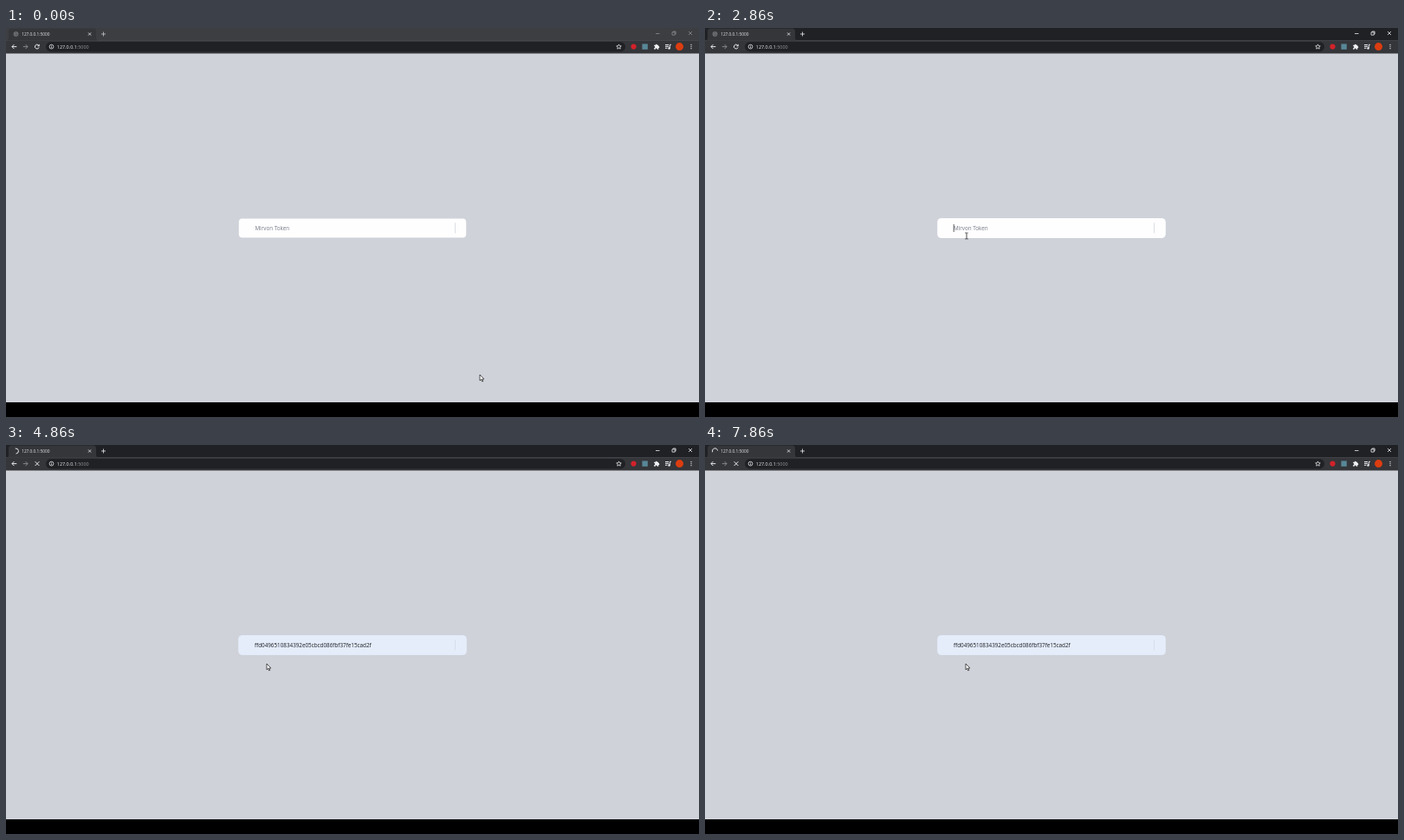
An HTML page for the animation above (8 s loop, 800 by 450 pixels).

```html
<!DOCTYPE html>
<html lang="en">
<head>
<meta charset="utf-8">
<title>Token form</title>
<style>
  html, body { margin: 0; width: 100%; height: 100%; overflow: hidden; background: #000; }
  svg { display: block; width: 100vw; height: 100vh; }
  text { font-family: "Open Sans", "Noto Sans", sans-serif; white-space: pre; }
  .line { fill: none; stroke: #e8eaed; stroke-width: 1; }
  .dim { stroke: #85878b; }
  .thin { stroke-width: .8; }
  #strip { fill: #202124; }
  .inactive #strip { fill: #3c3e42; }
  .inactive #buttons { stroke: #898b8f; }
  .inactive #plus { stroke: #c4c6c9; }
</style>
</head>
<body>
<svg id="stage" viewBox="0 0 800 450">
  <rect width="800" height="450" fill="#cfd2d9"/>

  <!-- tab strip -->
  <rect id="strip" width="800" height="14.5"/>
  <path d="M0 14.5Q3 14.5 3 11.5V4Q3 .5 6.5 .5H100.5Q104 .5 104 4V11.5Q104 14.5 107 14.5Z" fill="#35363a"/>
  <g id="globe">
    <circle cx="11.5" cy="7" r="2.6" fill="#55575b" stroke="#85878b" stroke-width=".6"/>
    <path d="M9.5 5.5L11.4 6.6L11 8.6M12 4.7L13.6 6.8" fill="none" stroke="#85878b" stroke-width=".6"/>
  </g>
  <path id="spinner" class="line" stroke-linecap="round"/>
  <text x="18.2" y="8.8" font-size="4.75" fill="#e4e6e9">127.0.0.1:5000</text>
  <path class="line thin" d="M95 5.4L98.2 8.6M98.2 5.4L95 8.6"/>
  <path id="plus" class="line thin" d="M112.5 4.5V9.5M110 7H115"/>
  <path id="buttons" class="line thin" d="M750 6.5H754.5M769 4.9H772.2V8.1H769ZM770 4.8V4H773.1V7.1H772.3M788 4L792 8M792 4L788 8"/>

  <!-- toolbar -->
  <rect y="14.2" width="800" height="15.3" fill="#35363a"/>
  <rect x="46" y="16" width="669" height="11.4" rx="5.7" fill="#202124"/>
  <path class="line" d="M12.3 21.6H7M9.4 19.1L6.9 21.6L9.4 24.1"/>
  <path class="line dim" d="M19.8 21.6H25M22.6 19.1L25.1 21.6L22.6 24.1"/>
  <g id="reload">
    <path class="line" d="M37.6 20A2.4 2.4 0 1 0 38.1 22.4"/>
    <path d="M38.7 18.5V21.2H36Z" fill="#e8eaed"/>
  </g>
  <path id="stop" class="line" d="M33.6 19.2L38.4 24M38.4 19.2L33.6 24"/>
  <circle class="line thin" cx="52.5" cy="21.6" r="2.4"/>
  <path class="line thin" d="M52.5 21.3V23M52.5 20.1V20.7"/>
  <text x="58.8" y="23.6" font-size="5.45" fill="#eceef0">127.0.0.1<tspan fill="#94989d">:5000</tspan></text>
  <path id="star" class="line thin" stroke-linejoin="round"/>
  <circle cx="724.5" cy="21.6" r="3.1" fill="#d3222a"/>
  <rect x="734.4" y="18.4" width="6.4" height="6.4" fill="#588897"/>
  <path d="M748.2 19.8H749.7A1.1 1.1 0 0 1 751.9 19.8H753.2V21.1A1.1 1.1 0 0 1 753.2 23.3V24.7H751.8A1.1 1.1 0 0 0 749.6 24.7H748.2V23.2A1.1 1.1 0 0 0 748.2 21Z" fill="#f1f3f4"/>
  <path class="line" d="M761 19.5H765M761 21.4H765M761 23.3H763.4M766.3 23.5V19.3H767.9"/>
  <circle cx="765.5" cy="23.5" r="1.2" fill="#e8eaed"/>
  <circle cx="777.5" cy="21.6" r="4.5" fill="#dc3d10"/>
  <g fill="#e8eaed">
    <circle cx="791" cy="19.5" r=".65"/><circle cx="791" cy="21.6" r=".65"/><circle cx="791" cy="23.7" r=".65"/>
  </g>

  <!-- form -->
  <rect id="field"/>
  <path id="divider" d="M518.5 225.3V237.3" stroke-width=".8"/>
  <text id="label" y="234.2" font-size="6.32"></text>
  <path id="caret" d="M287.2 227V236" stroke="#222" stroke-width=".7"/>

  <!-- pointer -->
  <path id="arrow" d="M0 0V6.9L1.6 5.5L2.7 8L3.8 7.5L2.7 5.1H4.8Z" fill="#fff" stroke="#111" stroke-width=".7" stroke-linejoin="round"/>
  <path id="beam" d="M-1.7 -3.5H-.4L0 -3.1L.4 -3.5H1.7M0 -3.1V3.1M-1.7 3.5H-.4L0 3.1L.4 3.5H1.7" fill="none" stroke="#222" stroke-width=".8"/>
  <rect y="433" width="800" height="17"/>
</svg>
<script>
  const LOOP = 8000, FPS = 7;
  const ACTIVE = 12, HOVER = 18, FOCUS = 20, FILL = 22, SUBMIT = 24;
  const SPIN_START = 3510, SPIN_TURN = 1320;
  const TOKEN = 'ffd0496510834392e05cbcd086fbf37fe15cad2f';

  // step, x, y; each position holds until the next one
  const path = [
    [0, 547, 401], [1, 500, 407], [2, 390, 420], [3, 285, 424.5], [4, 262, 436],
    [11, 238.5, 417], [13, 240, 410], [14, 247, 380], [15, 262, 330],
    [16, 280, 283], [17, 296, 253], [18, 302, 240.5], [21, 301.5, 247], [22, 301, 253]
  ];

  const $ = id => document.getElementById(id);
  const set = (id, attrs) => {
    for (const key in attrs) $(id).setAttribute(key, attrs[key]);
  };
  const show = (id, on) => set(id, { visibility: on ? 'visible' : 'hidden' });
  const polar = (cx, cy, r, deg) => {
    const a = deg * Math.PI / 180;
    return (cx + r * Math.cos(a)).toFixed(2) + ' ' + (cy - r * Math.sin(a)).toFixed(2);
  };

  const starPoints = Array.from({ length: 10 }, (_, i) =>
    polar(707.5, 21.8, i % 2 ? 1.4 : 2.9, 90 + 36 * i));
  set('star', { d: 'M' + starPoints.join('L') + 'Z' });

  // Counter-clockwise arc that grows from the top to a half turn, then rotates.
  function spinnerArc(elapsed) {
    const end = 90 + 360 * Math.max(elapsed, 0) / SPIN_TURN;
    const start = Math.max(end - 180, 90);
    const from = polar(11.5, 7, 3.1, start), to = polar(11.5, 7, 3.1, end);
    return `M${from}A3.1 3.1 0 0 0 ${to}`;
  }

  function render(step) {
    const focused = step >= FOCUS, filled = step >= FILL, loading = step >= SUBMIT;
    $('stage').classList.toggle('inactive', step < ACTIVE);

    show('globe', !loading);
    show('reload', !loading);
    show('stop', loading);
    show('spinner', loading);
    set('spinner', { d: spinnerArc(step * 1000 / FPS - SPIN_START) });

    const grow = focused ? .6 : 0;
    set('field', {
      x: 268.8 - grow, y: 220.6 - grow, width: 262.4 + 2 * grow, height: 21.8 + 2 * grow,
      rx: 4 + grow, fill: filled ? '#e5edfb' : '#fefeff'
    });
    set('divider', { stroke: filled ? '#d3dae7' : '#d3d6dc' });
    set('label', { x: focused ? 286.9 : 287.4, fill: filled ? '#1c1e22' : '#747983' });
    $('label').textContent = filled ? TOKEN : 'Mirvon Token';
    show('caret', focused && !filled);

    const [, x, y] = path.filter(p => p[0] <= step).pop();
    const beam = step >= HOVER && step <= FOCUS;
    show('arrow', !beam);
    show('beam', beam);
    set(beam ? 'beam' : 'arrow', { transform: `translate(${x} ${y})` });
  }

  const origin = performance.now();
  let last = -1;
  function tick() {
    const time = (performance.now() - origin) % LOOP;
    const step = Math.floor((time + 5) * FPS / 1000) % (LOOP * FPS / 1000);
    if (step !== last) render(last = step);
    requestAnimationFrame(tick);
  }
  tick();
</script>
</body>
</html>
```
